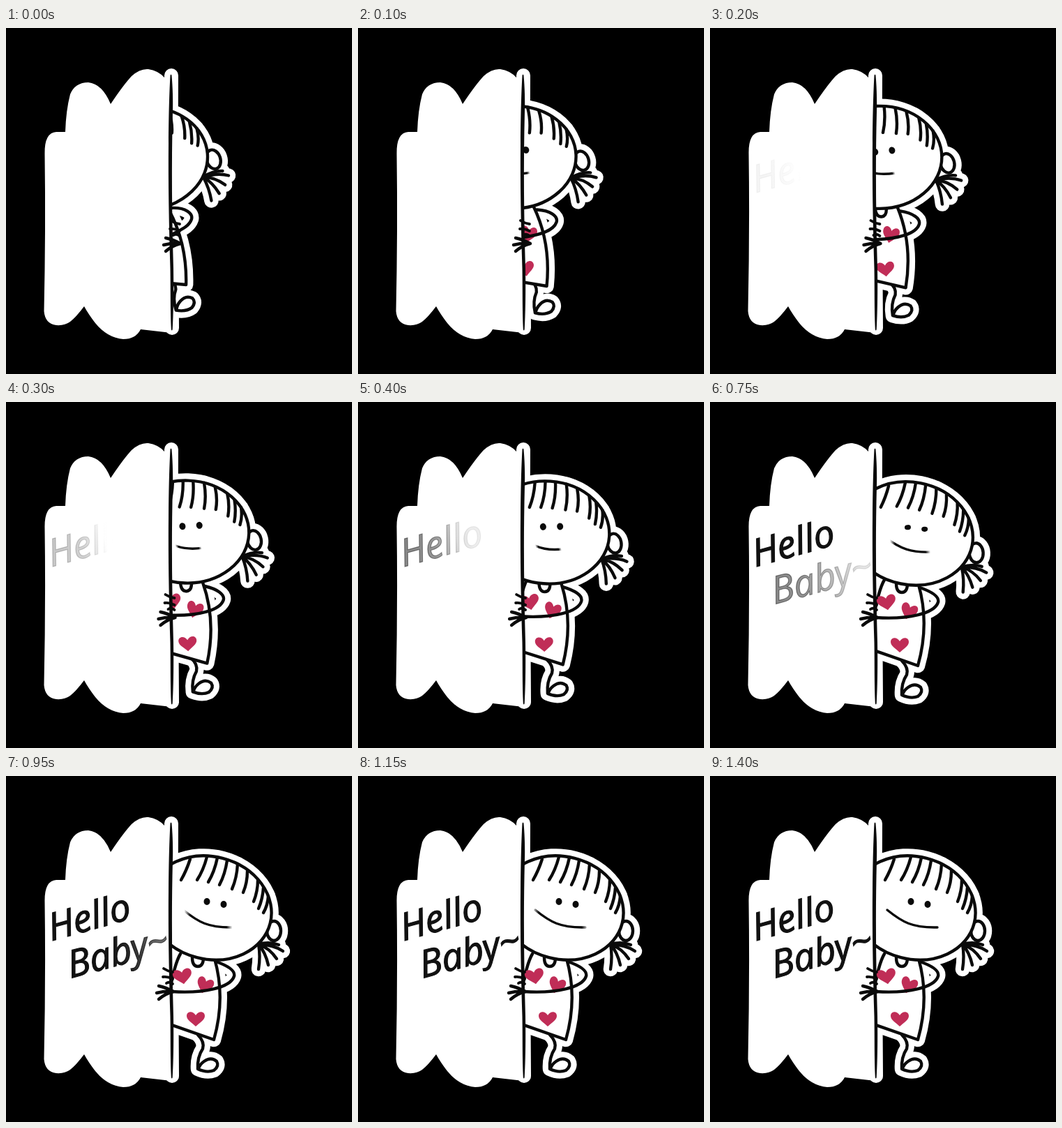
Animation of 496x496 px, one loop 2.5 s. Source, as an HTML page:

```html
<!DOCTYPE html>
<html lang="en">
<head>
<meta charset="utf-8">
<title>Hello Baby</title>
<style>
  html, body { margin: 0; width: 100%; height: 100%; overflow: hidden; background: #000; }
  svg { display: block; width: 100vw; height: 100vh; }
  path { stroke-linecap: round; stroke-linejoin: round; }
  .ink { stroke: #0a0a0a; stroke-width: 4.4px; }
  .halo { stroke: #fff; stroke-width: 20.500px; }
  .white { fill: #fff; }
  .line { fill: none; }
  .heart { fill: #c02d57; stroke: none; }
  .eye { fill: #0a0a0a; stroke: none; }
  text { font: italic 54px "Open Sans", "Noto Sans", sans-serif; stroke-width: 1.2px; }
</style>
</head>
<body>
<svg viewBox="0 0 496 496">
  <defs>
    <clipPath id="door"><rect x="236" y="0" width="260" height="496"/></clipPath>
    <linearGradient id="fade1"></linearGradient>
    <linearGradient id="fade2"></linearGradient>
    <linearGradient id="lip" gradientUnits="userSpaceOnUse" y1="0" y2="0">
      <stop offset="0" stop-color="#0a0a0a" stop-opacity="0"/>
      <stop offset=".12" stop-color="#0a0a0a"/>
      <stop offset=".88" stop-color="#0a0a0a"/>
      <stop offset="1" stop-color="#0a0a0a" stop-opacity="0"/>
    </linearGradient>
    <path id="heart" d="M0 11 C-6 5 -13 2 -13 -4 C-13 -11 -4 -12 0 -5 C4 -12 13 -11 13 -4 C13 2 6 5 0 11Z"/>

    <g id="figure">
      <g class="body">
        <path id="leg" class="white" d="M275 371 Q285 381 282 391 Q274 403 275 420 Q288 426 298 422 Q306 416 302 409 Q294 402 284 409 Q277 414 276 420"/>
        <path class="white" d="M250 255 Q238 275 228 353.5 L298 378 Q315 318 299 262"/>
        <use href="#heart" class="heart" transform="translate(253 287) rotate(-10) scale(1.05)"/>
        <use href="#heart" class="heart" transform="translate(285 300) rotate(20) scale(.92 1.1)"/>
        <use href="#heart" class="heart" transform="translate(272 348)"/>
        <path class="white" d="M267 260 Q267 273 275 273 Q283 273 283 260"/>
      </g>
      <path id="arm" class="line"/>
      <g class="body">
        <g id="head">
          <path class="line" d="M362 241 Q378 237 391 242 M362 241 Q384 242 397 251 M362 241 Q378 247 388 262
            M362 241 Q372 253 376 271 M362 241 Q365 259 362 277"/>
          <ellipse class="white" cx="384" cy="222" rx="10" ry="14"/>
          <ellipse class="white" cx="292" cy="189" rx="89.5" ry="73.5" transform="rotate(14.5 292 189)"/>
          <path class="line" d="M264 119 Q259 135 251 149 M288 116 Q283 135 274 149 M303 117 Q299 137 290 152
            M317 121 Q314 141 306 156 M332 126 Q331 146 324 162 M346 136 Q346 153 340 167
            M361 149 Q361 165 355 180 M369 160 Q368 176 362 190 M376 172 Q375 186 369 196"/>
          <ellipse class="eye" cx="288" cy="180" rx="4.5"/>
          <ellipse class="eye" cx="312" cy="184" rx="4.5"/>
          <path class="line" stroke="url(#lip)" stroke-width="3.4" d="M254 192 C275 209 290 218 326 217"/>
        </g>
      </g>
    </g>
  </defs>

  <path class="white" d="M55.500 180 Q55 150 72 149 L85 149 Q86 118 92 95 Q99 78 118 78 Q138 80 150 109 Q168 82 180 69
    Q192 58 204 59 Q218 61 227 71 L237 71 V437 L228 436 L193 432 Q186 446 168 446 Q145 444 128 423 Q118 410 112 399
    Q100 415 92 421 Q84 427 72 426 Q56 424 54.500 406 Q57 290 55.500 180Z"/>
  <path class="line" stroke="#fff" stroke-width="20" d="M237 68 L236.500 200 L238 430"/>

  <g clip-path="url(#door)">
    <use href="#figure" class="halo"/>
    <use href="#figure" class="ink"/>
  </g>

  <path fill="#0a0a0a" d="M235.500 68 Q236.500 65 237.500 68 C239 85 239.500 105 239 120 C237 200 238 270 240 345
    C240.500 380 240 410 238.700 432 Q237.800 435 236.800 432 C235.500 405 236 375 235.500 345 C233.500 280 232.500 220 233 165 C233.300 120 234.300 90 235.500 68Z"/>
  <g id="hands" class="ink line">
    <path d="M240 309 Q229 303 219 301 M240 309 Q228 308 216 311 M240 309 Q228 312 219 320"/>
    <path d="M239 281 Q232 280 226 276 M239 291 Q232 287 225 288 M239 298 Q234 294 230 297" stroke-width="3.8"/>
  </g>

  <text fill="url(#fade1)" stroke="url(#fade1)" transform="translate(65 236.500) rotate(-15.500) skewX(-3)">Hello</text>
  <text fill="url(#fade2)" stroke="url(#fade2)" transform="translate(92.500 290) rotate(-15) skewX(-3)">Baby~</text>
</svg>
<script>
  const LOOP = 2500, STEP = 50;
  const $ = id => document.getElementById(id);
  const clamp = v => Math.min(1, Math.max(0, v));
  const set = (el, attrs) => { for (const k in attrs) el.setAttribute(k, attrs[k]); };
  const bodies = document.querySelectorAll('.body');
  const eyes = document.querySelectorAll('.eye');

  // Each stop: position along the word, time its letter begins to show
  const words = [
    ['fade1', [[.15, 150], [.42, 170], [.58, 220], [.69, 290], [.87, 330]]],
    ['fade2', [[.1, 500], [.32, 515], [.53, 560], [.71, 600], [.9, 660]]]
  ];
  const stops = words.flatMap(([id, list]) => list.map(([offset, start]) => {
    const el = document.createElementNS('http://www.w3.org/2000/svg', 'stop');
    set(el, { offset, 'stop-color': '#111' });
    $(id).append(el);
    return { el, start };
  }));

  const armIn = [237, 258, 258, 257, 268, 266, 266, 274, 262, 286, 248, 290, 238, 296];
  const armOut = [301, 266, 318, 272, 329, 279, 327, 287, 322, 303, 285, 312, 238, 309];

  function draw(t) {
    const lean = clamp(1 - t / 600) ** 2;
    const bodyTurn = -14.3 * lean;
    const headTurn = -19 * clamp(1 - t / 900);
    bodies.forEach(b => set(b, { transform: `rotate(${bodyTurn} 238 532)` }));
    set($('head'), { transform: `rotate(${headTurn - bodyTurn} 280 262)` });
    set($('leg'), { transform: `translate(0 ${-10 * lean})` });
    set($('hands'), { transform: `translate(${10 * lean} 0)` });

    const arm = armOut.map((v, i) => v + (armIn[i] - v) * lean);
    set($('arm'), { d: `M${arm.slice(0, 2)} C${arm.slice(2)}` });

    const smile = 18 + 30 * clamp((t - 400) / 1000);
    set($('lip'), { x1: 290 - smile, x2: 290 + smile });

    const squint = clamp(1 - Math.abs(t - 775) / 125);
    eyes.forEach(e => set(e, { ry: 5 - 1.8 * squint }));

    for (const { el, start } of stops)
      set(el, { 'stop-opacity': clamp((t - start) / 400) ** 1.5 });
  }

  const begin = performance.now();
  function tick() {
    const t = (performance.now() - begin) % LOOP;
    draw(Math.floor(t / STEP) * STEP);
    requestAnimationFrame(tick);
  }
  tick();
</script>
</body>
</html>
```
